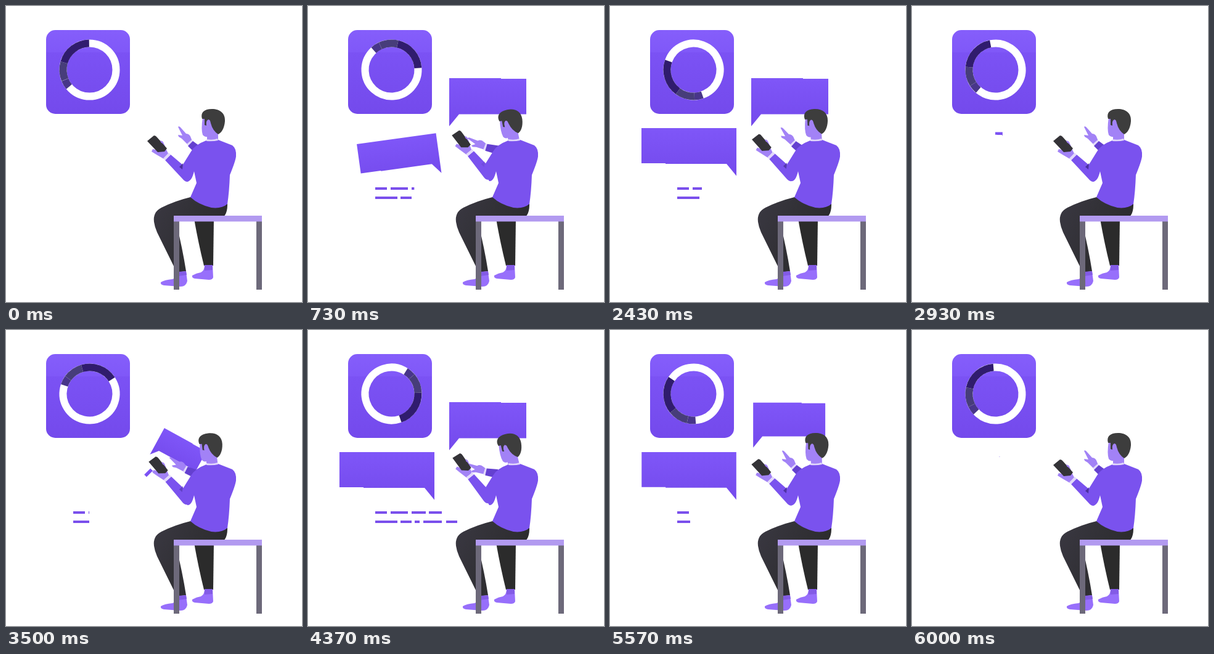
An HTML page that plays this animation: 480 px wide and 480 px high, repeating every 6.03 s.

```html
<!DOCTYPE html>
<html lang="en">
<head>
<meta charset="utf-8">
<title>Chat and chart</title>
<style>
html, body { margin: 0; width: 100%; height: 100%; overflow: hidden; background: #fff; }
svg { display: block; width: 100vw; height: 100vh; }
.skin { fill: #a282f6; }
.foot { fill: #976ffb; }
.shirt { fill: #7a52ee; }
.hair { fill: #3d3d3d; }
.cuff { fill: #e2d8fb; }
</style>
</head>
<body>
<svg viewBox="0 0 480 480">
  <defs>
    <linearGradient id="violet" x2="0" y2="1">
      <stop stop-color="#7f56f8"/><stop offset="1" stop-color="#744aec"/>
    </linearGradient>
    <linearGradient id="tile" x2="0" y2="1">
      <stop stop-color="#855efb"/><stop offset=".26" stop-color="#8058f8"/>
      <stop offset=".27" stop-color="#7b52f4"/><stop offset="1" stop-color="#744aec"/>
    </linearGradient>
    <linearGradient id="thigh" x2="1" y2=".5">
      <stop stop-color="#3a3842"/><stop offset="1" stop-color="#2a2a2b"/>
    </linearGradient>
    <clipPath id="wipe"><rect id="wipeBox" x="109" y="290" width="0" height="28"/></clipPath>
  </defs>

  <rect x="65" y="39" width="136" height="136" rx="15" fill="url(#tile)"/>
  <g id="ring" fill="none" stroke-width="12"></g>

  <path id="bubbleA" fill="url(#violet)" d="M229 117H313V118H354V175.500H245L229 195Z"/>
  <path id="bubbleB" fill="url(#violet)" d="M51 198H205V275.500L189 256H90V255H51Z"/>
  <g clip-path="url(#wipe)" fill="none" stroke="#7a4fec" stroke-width="4">
    <path d="M109 296H128M134 296H162M168 296H191M196 296H217"/>
    <path d="M109 311H145M150 311H168M173 311H181M187 311H217M224 311H242"/>
  </g>

  <g id="farArm">
    <path class="skin" d="M279 196Q281 194 284 198L292 207Q298 207 300 214L302 219L295 225L285 215L280 212L279 209L286 210Z"/>
    <path class="cuff" d="M301 217L304 220L296 227L293 224Z"/>
    <path fill="#6440d0" d="M303 219L318 230L308 240L295 227Z"/>
  </g>

  <path fill="#2b2b2b" d="M305 345H337L336 421H321Q312 385 305 345Z"/>
  <path class="foot" d="M322 420H335L336 440Q335 444 329 444L306 442Q301 441 302 437Q309 433 316 432Q322 429 322 420Z"/>
  <path fill="url(#thigh)" d="M299 310Q274 316 252 327Q238 334 240 350Q241 358 245 367L277 432L292 430Q286 392 276 352L276 344H348Q360 341 359 318Z"/>
  <path class="foot" d="M279 432L292 431L294 446Q292 455 283 455L256 453Q250 452 251 448Q257 444 270 443Q280 440 279 432Z"/>
  <path fill="#835be6" d="M279 431L292 430L293 436L280 438ZM322 420H335V428L322 429Z"/>

  <g id="head">
    <path class="skin" d="M319 181Q316 200 319 209Q322 213 326 212V218H344V196L336 180Z"/>
    <path class="hair" d="M318 183C315 173 321 167 334 167C347 167 356 174 355 187C354 199 349 206 344 208Q335 202 332 190Q331 184 328 184Q324 186 325 194L322 193V183Z"/>
    <path class="skin" d="M326 186Q332 182 331 191Q330 199 326 199Q324 193 326 186Z"/>
  </g>
  <path class="shirt" d="M325 218Q335 220 344 217L367 226Q374 231 373 244Q372 252 363 274Q362 302 359 321Q350 329 333 327Q312 322 299 310L309 287L305 268Q301 285 294 284L282 265L300 236Q306 225 325 218Z"/>
  <path class="cuff" d="M325 216Q335 218 343 215L344 218Q335 220 325 219Z"/>

  <g id="nearArm">
    <path class="shirt" d="M258 250L267 241L287 258L302 270Q299 285 294 285Q290 285 286 280Z"/>
    <path id="crease" fill="#4b30a0" d="M281 261L287 255L286 265Z"/>
    <path class="skin" d="M247 218L253 219L257 225L259 231L263 239L256 248L244 241L236 236L238 232L246 234Z"/>
    <path class="cuff" d="M264 238L267 241L258 250L255 247Z"/>
    <path fill="#343337" d="M229 219L240 210Q243 210 245 213L261 231L257 236L246 237Z"/>
    <path class="skin" d="M250 219Q254 218 256 223L252 222Z"/>
  </g>

  <path fill="#6d697a" d="M272 345H281V460H272ZM406 345H415V460H406Z"/>
  <path fill="#b29af0" d="M272 340H415V349.500H272Z"/>
</svg>
<script>
const LOOP = 6030, CYCLE = LOOP / 2;
const el = id => document.getElementById(id);
const clamp = x => Math.min(1, Math.max(0, x));
const ramp = (t, a, b) => clamp((t - a) / (b - a));
const smooth = (t, a, b) => { const x = ramp(t, a, b); return x * x * (3 - 2 * x); };
const move = (id, value) => el(id).setAttribute('transform', value);

// Ring slices: start angle, sweep, colour
el('ring').innerHTML = [
  [0, 360, '#fff'], [230.5, 17.5, '#483689'], [248, 38, '#473d7a'], [286, 73, '#301c6e']
].map(([from, sweep, colour]) =>
  `<circle r="43" pathLength="360" stroke="${colour}" stroke-dasharray="${sweep} ${360 - sweep}" transform="rotate(${from - 90})"/>`
).join('');

// The picture advances in 30/70 ms holds, later in 30/40/30 ms holds
function hold(t) {
  const rest = t % 100;
  return t - rest + (rest < 30 ? 0 : rest < 70 || t < 3130 ? 30 : 70);
}

function bubble(id, t, enter, leave, twist) {
  const leaving = t > leave.from;
  const { x, y, from, to } = leaving ? leave : enter;
  const grow = smooth(t, from, to);
  const size = leaving ? 1 - grow : grow;
  const turn = leaving ? 0 : twist * (1 - size);
  move(id, `translate(${x} ${y}) rotate(${turn}) scale(${size}) translate(${-x} ${-y})`);
}

function draw(now) {
  const time = hold(now % LOOP), t = time % CYCLE;
  move('ring', `translate(135.500 103.500) rotate(${time / LOOP * 720})`);

  bubble('bubbleA', t, { x: 229, y: 210, from: 240, to: 660 }, { x: 278, y: 130, from: 2490, to: 2910 }, 76);
  bubble('bubbleB', t, { x: 238, y: 224, from: 403, to: 840 }, { x: 142, y: 205, from: 2540, to: 3010 }, -50);
  el('wipeBox').setAttribute('width', 133 * (ramp(t, 315, 1187) - ramp(t, 1820, 2692)));

  // The tapping arm moves a little ahead of the head
  const lean = smooth(t, 20, 1000) - smooth(t, 1750, 2720);
  const reach = smooth(t, 20, 800) - smooth(t, 1750, 2600);
  const tap = lean ** 8 * (0.5 - 0.5 * Math.cos((t - 1630) / 550 * 2 * Math.PI));
  move('head', `translate(${-2 * lean} 0) rotate(${-14 * lean} 335 215)`);
  move('nearArm', `translate(${-2 * lean} ${-4 * lean}) rotate(${7 * lean} 293 275)`);
  move('farArm', `translate(${-7 * reach} ${reach}) rotate(${-28 * reach - 4 * tap} 308 232)`);
  el('crease').setAttribute('opacity', 1 - lean);
  requestAnimationFrame(draw);
}
requestAnimationFrame(draw);
</script>
</body>
</html>
```
